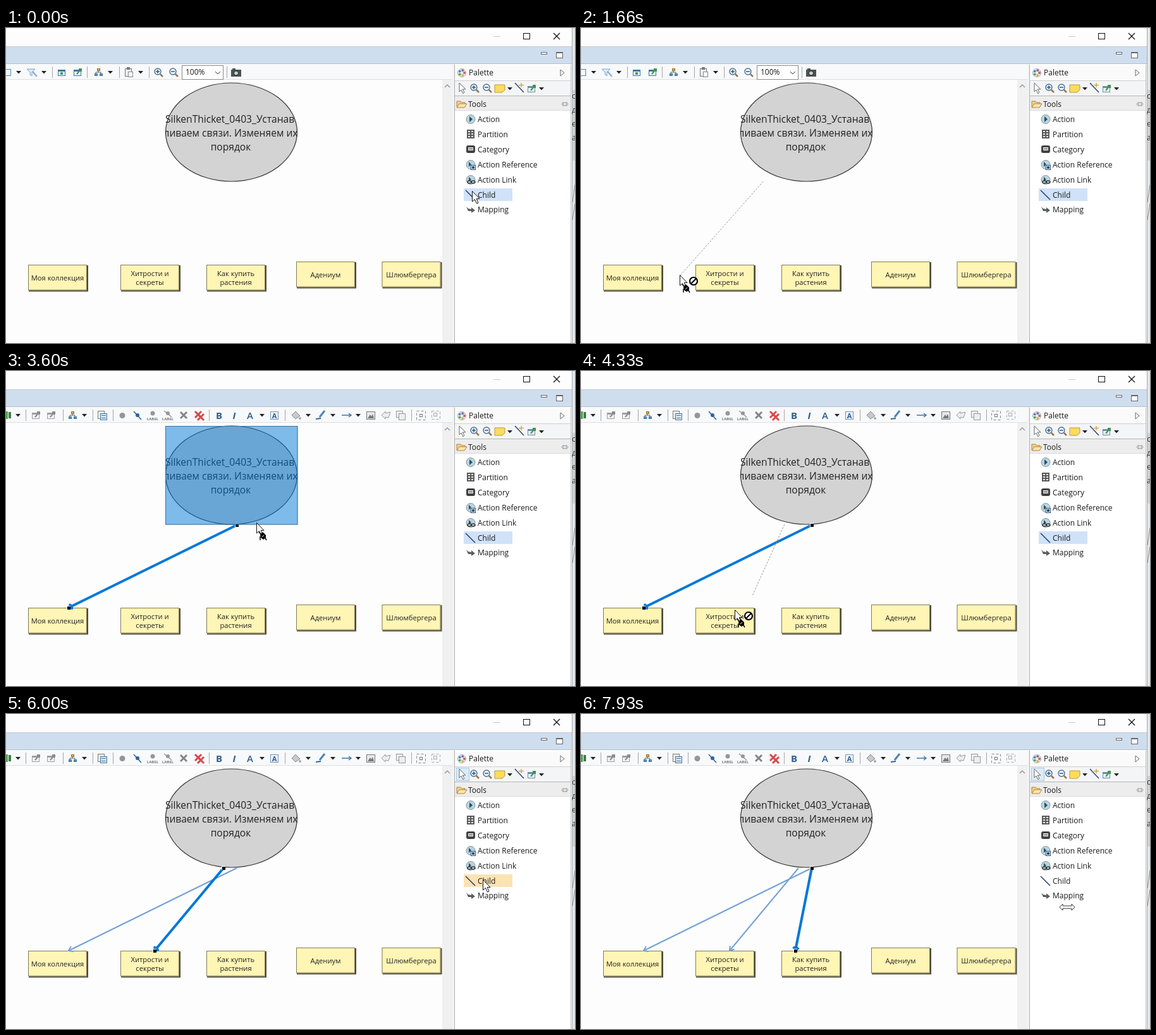
An HTML page with a canvas for the animation above (8000 ms loop, 900 by 499 pixels).

```html
<!DOCTYPE html>
<html lang="ru">
<head>
<meta charset="utf-8">
<title>Diagram editor</title>
<style>
html, body { margin: 0; width: 900px; height: 499px; overflow: hidden; background: #fdfdfd }
canvas { display: block }
</style>
</head>
<body>
<canvas id="stage" width="900" height="499"></canvas>
<script>
const c = document.getElementById('stage').getContext('2d');
const LOOP = 8000, STEP = 1000 / 15, LAG = 33;
const BLUE = '#0078d7', STEEL = '#3c78a8', GRAY = '#969696';
const ELLIPSE = { x: 252, y: 87, w: 209, h: 156 };
const TITLE = ['SilkenThicket_0403_Устанав', 'ливаем связи. Изменяем их', 'порядок'];
const NODES = [
  [35, 375, 'Моя коллекция'], [181, 375, 'Хитрости и', 'секреты'],
  [317, 375, 'Как купить', 'растения'], [459, 370, 'Адениум'], [594.5, 370, 'Шлюмбергера'],
].map(([x, y, ...lines]) => ({ x, y, w: 93, h: 40.5, lines }));
const LINKS = [ // from, to, time of creation
  [365, 244, 99, 375, 2260], [344, 244, 235, 375, 4860], [365, 244, 339, 375, 7660],
];
const DRAGS = [[1200, 2260], [4000, 4860], [6860, 7660]];
const TOOL_ON = [[0, 2260], [3460, 4860], [6060, 7660]];
const TOOLS = ['Action', 'Partition', 'Category', 'Action Reference', 'Action Link', 'Child', 'Mapping'];
const PATH = [ // time, x, y
  [0, 737, 258], [60, 737, 258], [130, 740, 245], [400, 462, 192], [460, 452, 190], [860, 367, 170],
  [930, 365, 169], [1200, 365, 169], [1600, 158, 392], [1660, 157, 391], [2000, 95, 391],
  [2260, 94, 391], [2860, 735, 216], [3000, 755, 242], [3060, 757, 268], [3460, 757, 268],
  [3530, 420, 236], [3600, 396, 240], [3900, 362, 205], [4060, 358, 205], [4260, 310, 300],
  [4297, 274, 354], [4330, 243, 378], [4530, 240, 397], [4800, 240, 397], [5600, 757, 279],
  [5660, 757, 279], [5730, 754, 262], [6000, 754, 262], [6460, 430, 205], [6800, 362, 190],
  [6860, 362, 190], [7130, 345, 421], [7400, 350, 396], [7600, 350, 396], [7930, 757, 300], [LOOP, 757, 300],
];

const within = (ranges, t) => ranges.some(([a, b]) => t >= a && t < b);
const inside = (b, [x, y]) => x >= b.x && x <= b.x + b.w && y >= b.y && y <= b.y + b.h;

function pointer(t) {
  const i = Math.max(1, PATH.findIndex(p => p[0] >= t));
  const [a, b] = [PATH[i - 1], PATH[i]], k = (t - a[0]) / (b[0] - a[0]);
  return [a[1] + (b[1] - a[1]) * k, a[2] + (b[2] - a[2]) * k];
}

function box(x, y, w, h, fill, stroke) {
  if (fill) { c.fillStyle = fill; c.fillRect(x, y, w, h); }
  if (stroke) { c.lineWidth = 1; c.strokeStyle = stroke; c.strokeRect(x + .5, y + .5, w - 1, h - 1); }
}
function shape(points, fill, stroke, width = 1, dx = 0, dy = 0) {
  c.beginPath();
  for (let i = 0; i < points.length; i += 2) c.lineTo(points[i] + dx, points[i + 1] + dy);
  if (fill) { c.closePath(); c.fillStyle = fill; c.fill(); }
  if (stroke) { c.lineWidth = width; c.strokeStyle = stroke; c.stroke(); }
}
const line = (x1, y1, x2, y2, color, width = 1) => shape([x1, y1, x2, y2], null, color, width);
function disc(x, y, r, fill, stroke, width = 1, ry = r) {
  c.beginPath();
  c.ellipse(x, y, r, ry, 0, 0, 7);
  if (fill) { c.fillStyle = fill; c.fill(); }
  if (stroke) { c.lineWidth = width; c.strokeStyle = stroke; c.stroke(); }
}
function text(s, x, y, size = 12, color = '#1a1a1a', align = 'left', style = '') {
  c.font = `${style} ${size}px "Open Sans", "Noto Sans", sans-serif`;
  c.textAlign = align;
  c.fillStyle = color;
  c.fillText(s, x, y);
}

// Small icons, placed by centre
const drop = (x, y = 70) => shape([-4, -2, 4, -2, 0, 2.5], '#222', null, 1, x, y);
const bar = x => line(x + .5, 61, x + .5, 79, '#a5a5a5');
const cross = (x, y, color) => {
  line(x - 5, y - 5, x + 5, y + 5, color, 3);
  line(x - 5, y + 5, x + 5, y - 5, color, 3);
};
function zoom(x, y, plus) {
  line(x + 3, y + 3, x + 7, y + 7, '#9a7446', 2.5);
  disc(x - 1, y - 1, 5, '#f4f8fc', '#4c6d8d', 1.4);
  line(x - 4, y - 1, x + 2, y - 1, '#24598a', 1.5);
  if (plus) line(x - 1, y - 4, x - 1, y + 2, '#24598a', 1.5);
}
function sheet(x, y, color, pin) {
  box(x - 6, y - 4, 12, 10, '#edf3f8', color);
  box(x - 6, y - 4, 12, 3, color);
  if (pin) { line(x - 1, y + 3, x + 4, y - 3, pin, 2); box(x + 2, y - 6, 5, 5, pin); }
}
function tree(x) {
  shape([x - 4, 72, x - 4, 70, x + 4, 70, x + 4, 72], null, '#555');
  line(x, 66, x, 70, '#555');
  box(x - 2, 64, 5, 4, '#e0b252', '#8b6b26');
  box(x - 6, 72, 5, 4, '#5e91c4', STEEL);
  box(x + 2, 72, 5, 4, '#5e91c4', STEEL);
}
function slash(x, color) {
  line(x - 6, 64, x + 6, 77, color, 1.6);
  disc(x, 70, 3, color);
}

function toolbarIdle() {
  box(-6, 65, 14, 11, '#f4f8fc', '#5b86ad');
  drop(20); drop(60);
  shape([33, 65, 46, 65, 41, 70, 41, 76, 38, 74, 38, 70], '#dbe9f4', '#7ba6c9');
  line(42, 69, 49, 77, '#84aecd', 2);
  [73, 128, 179, 226, 349].forEach(bar);
  sheet(88, 70, STEEL); box(86, 70, 4, 4, '#4f9a5e');
  sheet(113, 70, STEEL, '#3d9455');
  tree(146); drop(165);
  box(188, 64, 11, 13, '#eee', '#777'); box(191, 62, 5, 4, '#777');
  box(193, 69, 8, 9, '#fff', '#888'); drop(213);
  zoom(241, 70, true); zoom(265, 70);
  box(278, 59, 66, 23, '#fff', '#8b8b8b');
  text('100%', 284, 74);
  shape([331, 69, 335, 73, 339, 69], null, '#333');
  box(356, 66, 16, 11, '#4b5050'); box(358, 64, 5, 3, '#4b5050');
  disc(364, 71.5, 3.5, '#bed0c9', '#222');
}

function toolbarSelected() {
  box(0, 64, 3, 12, '#5aa05e'); box(4, 65, 4, 10, '#37843f'); drop(19);
  [31, 90, 137, 169, 321, 441, 641].forEach(bar);
  sheet(47, 70, '#a0a0a0', '#8a8a8a'); sheet(71, 70, '#a0a0a0', '#8a8a8a');
  tree(105); drop(124);
  box(145, 63, 11, 13, '#f4efe0', '#7a7a7a'); box(149, 67, 11, 11, '#dae8f5', STEEL);
  line(151, 70.5, 158, 70.5, STEEL); line(151, 74.5, 158, 74.5, STEEL);
  disc(184, 70.5, 4.5, GRAY);
  slash(208, '#2d65a0');
  disc(232, 67, 3.5, GRAY);
  line(250, 63, 262, 73, GRAY, 1.5); disc(256, 67, 3, GRAY);
  text('LABEL', 232, 78, 6, '#777', 'center', 'bold');
  text('LABEL', 256, 78, 6, '#777', 'center', 'bold');
  cross(281, 70, '#858585'); cross(304, 69, '#d8474d'); cross(308, 73, '#d8474d');
  text('B', 337, 76, 15, '#2b5d91', 'center', 'bold');
  text('I', 361, 76, 15, '#2b5d91', 'center', 'italic bold');
  text('A', 386, 76, 15, '#2b5d91', 'center', '600');
  drop(405);
  box(418, 64, 13, 13, '#f2f7fb', '#6a91b3');
  text('A', 424.5, 75, 11, '#2b5d91', 'center', 'bold');
  shape([452, 70, 458, 64, 465, 71, 458, 76], '#c9c9c9', '#888'); disc(465, 75, 2, '#aaa'); drop(478);
  line(504, 63, 496, 73, '#4d83b4', 3); line(490, 76, 498, 75, '#2f669b', 2); drop(517);
  line(531, 70, 545, 70, '#41749e', 1.5); shape([542, 67, 546, 70, 542, 73], null, '#41749e', 1.5); drop(557);
  box(570, 64, 14, 13, '#e8e8e8', '#777'); shape([572, 75, 576, 69, 578, 72, 580, 68, 582, 75], '#777');
  shape([594, 70, 600, 64, 600, 67, 608, 65, 605, 74, 600, 73, 600, 76], '#eee', '#999');
  box(617, 63, 11, 11, '#eee', '#999'); box(621, 67, 11, 11, '#eee', '#999');
  c.setLineDash([4, 3]);
  box(649, 63, 15, 15, null, '#888'); box(673, 63, 14, 14, null, '#aaa');
  c.setLineDash([]);
  box(654, 68, 5, 5, null, '#777'); box(676, 66, 6, 6, null, '#aaa');
}

function windowFrame() {
  box(0, 0, 900, 499, '#fdfdfd');
  box(0, 29, 895, 1, '#c4c8cc'); box(0, 30, 895, 26, '#cfdeef'); box(0, 56, 895, 1, '#b4bfca');
  box(0, 57, 709, 24, '#f8f9fa'); box(0, 81, 706, 1, '#dedede');
  line(771, 13.5, 782, 13.5, '#c9c9c9');
  box(818, 8, 11, 10, null, '#111');
  line(866, 8, 876, 18, '#111', 1.2); line(866, 18, 876, 8, '#111', 1.2);
  box(846, 38, 10, 4, '#fff', '#666');
  box(870, 38, 11, 10, '#fff', '#666'); box(870, 38, 11, 2, '#666');
  box(690, 82, 16, 417, '#f0f0f0');
  shape([694, 94, 698, 90, 702, 94], null, '#999', 1.5);
  // strip of the window behind
  box(895, 0, 5, 499, '#e4e7e9'); box(895, 0, 1, 499, '#a4a9ad');
  box(896, 98, 4, 112, '#d0d1d2');
  ['с', 'д', 'е', 'а'].forEach((s, i) => text(s, 895, 112 + 22 * i, 12, '#333'));
  line(900, 248, 896, 276, '#888'); line(900, 278, 896, 304, '#888');
}

function palette(t, active, [px, py]) {
  box(706, 57, 4, 442, '#f4f4f4'); box(709, 58, 1, 441, '#adadad');
  box(710, 58, 185, 441, '#fff');
  box(710, 59, 183, 24, '#fafafa'); box(710, 83, 183, 24, '#f4f5f6'); box(710, 83, 183, 1, '#d0d0d0');
  box(710, 107, 183, 24, '#ededed'); box(710, 107, 183, 1, '#b5b5b5'); box(710, 130, 183, 1, '#dadada');
  box(893, 58, 1, 441, '#c0c0c0');
  disc(721, 71, 6.5, '#e8edf1', '#9aaab5');
  ['#d7584c', '#e7a83d', '#51a160', '#4682be', '#8a66aa'].forEach((color, i) =>
    disc(721 + 4 * Math.cos(i * 1.26), 71 + 4 * Math.sin(i * 1.26), 1.9, color));
  text('Palette', 732, 75);
  shape([877, 66, 883, 71, 877, 76], '#fff', '#666');
  if (!active) box(712, 85, 21, 21, '#dcebf8', '#a5c7e5');
  shape([717, 87, 717, 101, 720, 98, 723, 104, 725, 102, 722, 97, 727, 97], '#fff', '#666');
  zoom(741, 95, true); zoom(761, 95);
  shape([773, 90, 789, 90, 789, 98, 785, 102, 773, 102], '#ffdc5a', '#b39a46'); drop(797, 96);
  line(805, 87, 819, 102, '#243f78', 1.4);
  line(815, 87, 815, 94, '#d7a83c', 1.5); line(811, 90.5, 819, 90.5, '#d7a83c', 1.5);
  sheet(831, 96, '#6c8da5', '#3d9455'); drop(847, 96);
  shape([713, 125, 713, 116, 719, 116, 721, 118, 726, 118, 726, 125], '#f3cf83', '#af8441');
  shape([713, 126, 717, 120, 729, 120, 725, 126], '#fde5ad', '#af8441');
  text('Tools', 731, 124.5);
  shape([882, 117, 879, 120.5, 882, 124], null, '#888'); shape([886, 117, 889, 120.5, 886, 124], null, '#888');
  disc(884, 120.5, 2.5, null, '#999');

  TOOLS.forEach((label, i) => {
    const y = 144 + i * 24;
    c.font = '12px "Open Sans", "Noto Sans", sans-serif';
    const w = Math.round(c.measureText(label).width) + 49;
    const hover = px >= 724 && px < 724 + w && py >= y - 10 && py < y + 10 && t < 7900;
    const chosen = i == 5 && active;
    if (hover || chosen) box(724, y - 10, w, 20, chosen ? '#d0e2f8' : '#fde2b4');
    text(label, 746, y + (i == 6 ? 4 : 4.5));
  });
  [144, 216, 240].forEach(y => disc(735, y + .5, 7, '#bdd3dc', '#8498a1'));
  shape([733, 140, 738, 144.5, 733, 149], '#1d536c');
  shape([732, 212, 736, 216, 732, 220], '#1d536c'); box(735, 217, 8, 8, '#f4f8fb', '#234e75'); box(737, 219, 4, 4, '#234e75');
  shape([732, 236, 736, 240, 732, 243], '#1d536c');
  disc(733, 244, 3, null, '#333', 1.5, 2); disc(739, 244, 3, null, '#333', 1.5, 2);
  box(729, 161, 12, 14, '#5b5b5b');
  for (let i = 0; i < 6; i++) box(731 + i % 2 * 5, 163 + (i >> 1) * 4, 3, 2, '#e8e8e8');
  c.beginPath(); c.roundRect(728, 186, 14, 12, 3); c.fillStyle = '#414141'; c.fill();
  box(731, 189, 8, 5, '#ddd'); box(732, 191, 6, 1, '#414141');
  line(727, 257, 742, 272, '#1c3768', 1.4);
  shape([728, 283, 731, 286, 736, 287, 736, 284, 742, 289, 736, 293, 736, 290, 731, 290], '#59615f');
}

function nodes() {
  for (const { x, y, w, h, lines } of NODES) {
    box(x + 1, y + 1, w + 1, h + 1, '#4e4b3b');
    box(x, y, w, h, '#fff5b5', '#827b55');
    lines.forEach((s, i) => text(s, x + w / 2, y + 25 + (i * 2 - lines.length + 1) * 6.8, 11.2, '#222', 'center'));
  }
  disc(356.5, 165, 104, '#d3d3d3', '#333', 1.2, 78);
  c.save();
  c.beginPath(); c.rect(252, 87, 209.5, 156); c.clip();
  TITLE.forEach((s, i) => i
    ? text(s, 355.5, 150 + 22 * i, 15.6, '#222', 'center')
    : text(s, 252, 150, 15.6, '#222'));
  c.restore();
}

function highlight({ x, y, w, h }) {
  box(x, y, w + .5, h + .5, 'rgba(0,120,215,.5)', '#41729b');
}

function links(t) {
  const made = LINKS.filter(l => t >= l[4]);
  made.forEach(([x1, y1, x2, y2], i) => {
    const last = i == made.length - 1, color = last ? BLUE : '#72a0d8', width = last ? 4 : 2;
    const angle = Math.atan2(y2 - y1, x2 - x1), size = last ? 7 : 8;
    line(x1, y1, x2, y2, color, width);
    const tip = s => [x2 - size * Math.cos(angle + s), y2 - size * Math.sin(angle + s)];
    shape([...tip(.6), x2, y2, ...tip(-.6)], null, color, width);
    if (last) [[x1, y1], [x2, y2]].forEach(([x, y]) => {
      box(x - 3, y - 3, 6, 6, '#fff'); box(x - 2, y - 2, 5, 5, '#000');
    });
  });
}

function rubberBand([x, y], target) {
  const k = 78 / (y - 165), end = target ? (target.y - 165) / (y - 165) : 1;
  if (y <= 243) return;
  c.setLineDash([3, 2]);
  line(357 + (x - 357) * k, 243, 357 + (x - 357) * end, 165 + (y - 165) * end, '#999');
  c.setLineDash([]);
}

function cursor([x, y], linking, forbidden) {
  c.save();
  c.translate(Math.round(x), Math.round(y));
  shape([.5, .5, .5, 17, 4.5, 13.5, 7.5, 20, 10, 19, 7.2, 12.5, 12, 12.5], '#fff', '#111');
  if (linking) {
    line(4, 15, 8, 19, '#000', 1.5);
    shape([6, 19, 10, 15, 15, 20, 15, 24, 11, 27, 7, 24], '#000');
    line(6, 22, 6, 28, '#000', 1.5); line(13, 23, 16, 28, '#000', 1.5);
    line(9, 23, 12, 20, '#fff');
  }
  if (forbidden) {
    disc(22, 10, 6, '#fff', '#000', 2.2);
    line(18, 14, 26, 6, '#000', 2.2);
  }
  c.restore();
}

function resizeCursor(x, y) {
  shape([-12, 0, -7, -5, -7, -2, 7, -2, 7, -5, 12, 0, 7, 5, 7, 2, -7, 2, -7, 5, -12, 0], '#fff', '#333', 1, x, y);
}

function draw() {
  const now = performance.now() % LOOP;
  const t = Math.floor((now + 7) / STEP) % 120 * STEP;
  const at = pointer(t), seen = pointer(Math.max(0, t - LAG));
  const active = within(TOOL_ON, t), dragging = within(DRAGS, t);
  const target = active && NODES.find(n => inside(n, seen));
  const overSource = active && inside(ELLIPSE, seen);

  windowFrame();
  (t < 2260 ? toolbarIdle : toolbarSelected)();
  palette(t, active, at);
  nodes();
  links(t);
  if (overSource) highlight(ELLIPSE);
  if (target) highlight(target);
  if (dragging) rubberBand(seen, target);
  if (t > 7920) resizeCursor(769, 306);
  else cursor(at, active && at[0] < 690, dragging && !target && !overSource);
  requestAnimationFrame(draw);
}
draw();
</script>
</body>
</html>
```
